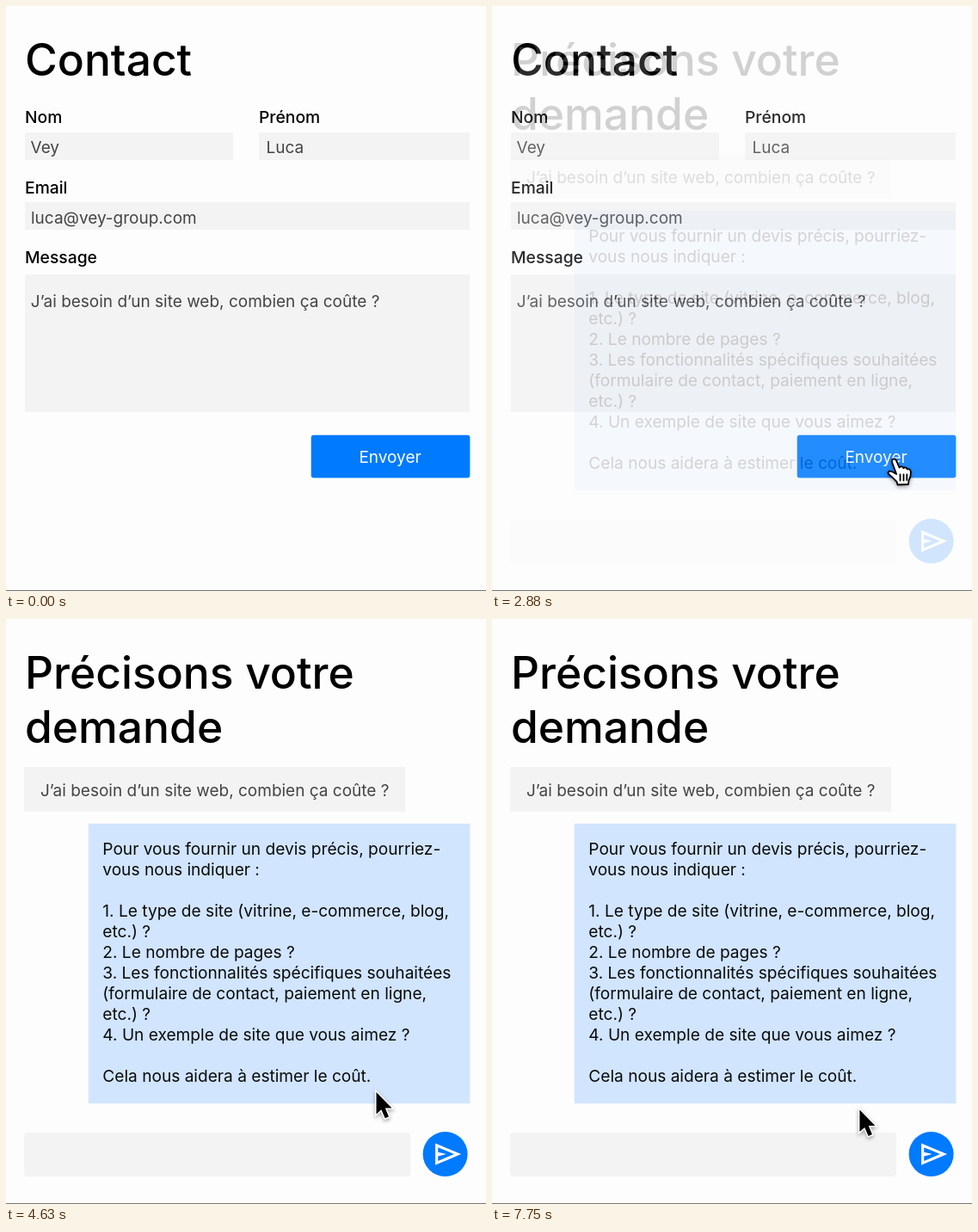
Animation of 558 by 680 pixels, one loop 8000 ms. Source, as an HTML page:

```html
<!DOCTYPE html>
<html lang="fr">
<head>
<meta charset="utf-8">
<title>Contact</title>
<style>
  html, body { margin: 0; width: 100%; height: 100%; overflow: hidden; background: #fdfdfd; }
  svg { display: block; width: 558px; height: 680px; }
  text { font: 400 19px Inter, sans-serif; font-optical-sizing: none; fill: #444; }
  .title { font-size: 51.5px; font-weight: 500; fill: #000; }
  .label { font-size: 19.3px; font-weight: 500; fill: #000; }
  .dark { font-size: 19.12px; fill: #0a0a0a; }
  .light { fill: #fff; }
  .field { fill: #f3f3f3; }
  .blue { fill: #007aff; }
  #cursor { filter: drop-shadow(0 2px 2px rgba(0, 0, 0, .35)); }
</style>
</head>
<body>
<svg viewBox="0 0 558 680">
  <rect width="558" height="680" fill="#fdfdfd"/>
  <g id="form">
    <text class="title" x="22" y="81.3">Contact</text>
    <text class="label" x="22" y="136">Nom</text>
    <text class="label" x="294" y="136">Prénom</text>
    <text class="label" x="22" y="217.5">Email</text>
    <text class="label" x="22" y="299">Message</text>
    <rect class="field" x="22" y="147" width="242" height="32"/>
    <rect class="field" x="294" y="147" width="245" height="32"/>
    <rect class="field" x="22" y="228" width="517" height="32"/>
    <rect class="field" x="22" y="312" width="517" height="160"/>
    <text x="28.5" y="171">Vey</text>
    <text x="302.5" y="171">Luca</text>
    <text x="29" y="252.5">luca@vey-group.com</text>
    <text x="28.8" y="350">J’ai besoin d’un site web, combien ça coûte ?</text>
    <rect class="blue" x="354.7" y="498.7" width="184.7" height="49.7" rx="3"/>
    <text class="light" x="446.5" y="531" text-anchor="middle">Envoyer</text>
  </g>
  <g id="chat" opacity="0">
    <rect width="558" height="680" fill="#fdfdfd"/>
    <text class="title" x="22" y="81.3">Précisons votre</text>
    <text class="title" x="22" y="143.7">demande</text>
    <rect class="field" x="21" y="172" width="443" height="52"/>
    <text x="39.9" y="206">J’ai besoin d’un site web, combien ça coûte ?</text>
    <rect x="95.8" y="237.8" width="443.6" height="325.4" fill="#d1e5ff"/>
    <g id="reply"></g>
    <rect class="field" x="21" y="597" width="449" height="51" rx="4"/>
    <circle class="blue" cx="510.6" cy="622" r="26"/>
    <path class="light" transform="translate(494.3 641) scale(.0395)"
      d="M120-160v-640l760 320-760 320Zm80-120 474-200-474-200v140l240 60-240 60v140Z"/>
  </g>
  <rect y="679" width="558" height="1" fill="#777"/>
  <g id="cursor">
    <path id="arrow" d="M1.5 3.5V29L7.3 23.8L11.7 33.8L16 32L11.8 22H19.5Z"
      stroke="#fff" stroke-width="3" paint-order="stroke"/>
    <g id="hand" transform="translate(-9 5)" stroke="#000" stroke-width="1.8"
      stroke-linejoin="round" stroke-linecap="round">
      <path fill="#fff" d="M12.6 20L7.6 6.5C6.3 2.6 11 1 12.5 4.4L16 12.5C17.5 10.8 20.3 11.2 20.8 13.2
        C22.3 11.8 25 12.4 25.3 14.5C27.5 13.6 29.2 15 29.3 17.5C29.5 21 29 24 27 27.5L26.5 32L14 32.5L13 29
        C10.5 26.5 8 23.5 4.5 21C1.5 18.5 3.5 16 6.5 17C9 17.8 11 19.2 12.6 20Z"/>
      <path fill="none" d="M17 20.5v7M21 20.5v7M24.8 20.5v6.5"/>
    </g>
  </g>
</svg>
<script>
const LOOP = 8000;
const $ = id => document.getElementById(id);
const chat = $('chat'), cursor = $('cursor'), arrow = $('arrow'), hand = $('hand');

const reply = [
  'Pour vous fournir un devis précis, pourriez-',
  'vous nous indiquer :',
  '',
  '1. Le type de site (vitrine, e-commerce, blog,',
  'etc.) ?',
  '2. Le nombre de pages ?',
  '3. Les fonctionnalités spécifiques souhaitées',
  '(formulaire de contact, paiement en ligne,',
  'etc.) ?',
  '4. Un exemple de site que vous aimez ?',
  '',
  'Cela nous aidera à estimer le coût.'
];
$('reply').innerHTML = reply.map((line, i) =>
  `<text class="dark" x="112.3" y="${273.6 + 24 * i}">${line}</text>`).join('');

// Pointer path: time, x, y
const path = [
  [2060, 582, 566], [2130, 555.7, 556.5], [2250, 512, 546], [2380, 476, 528],
  [2500, 466.5, 519], [3520, 466.5, 519], [3800, 448, 533], [4100, 433, 543],
  [4300, 430, 545], [4630, 429, 546.5], [6750, 427.5, 559.5], [8000, 425.5, 569]
];

const smooth = (t, start, span) => {
  const x = Math.min(1, Math.max(0, (t - start) / span));
  return x * x * (3 - 2 * x);
};

function pointer(t) {
  const i = path.findIndex(p => p[0] > t);
  if (i < 1) return [600, 600];
  const [t0, x0, y0] = path[i - 1], [t1, x1, y1] = path[i];
  const k = (t - t0) / (t1 - t0);
  return [x0 + (x1 - x0) * k, y0 + (y1 - y0) * k];
}

function draw(t) {
  const fade = smooth(t, 2778, 395);
  const [x, y] = pointer(t);
  const onButton = t > 2300 && fade < .65;
  chat.setAttribute('opacity', fade);
  cursor.setAttribute('transform', `translate(${x.toFixed(2)} ${y.toFixed(2)})`);
  arrow.style.display = onButton ? 'none' : '';
  hand.style.display = onButton ? '' : 'none';
}

const start = performance.now();
function tick() {
  draw((performance.now() - start) % LOOP);
  requestAnimationFrame(tick);
}
tick();
</script>
</body>
</html>
```
